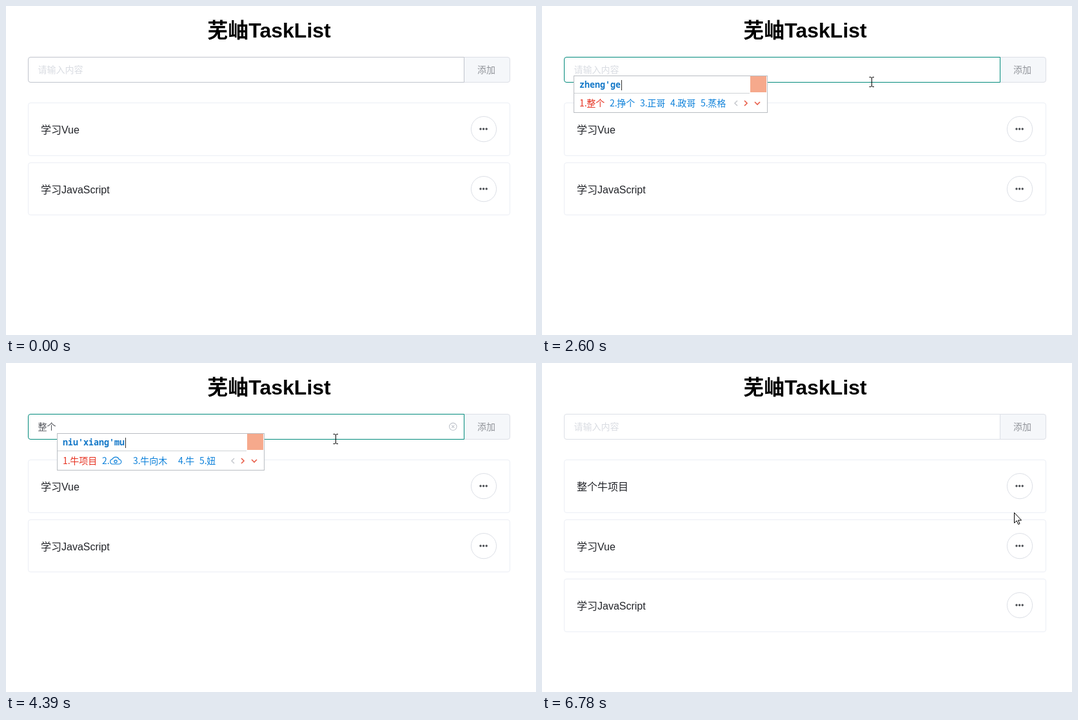
Recreate the animation shown at these times as an HTML page. Size 822 by 511 pixels, loop 6.86 s.

```html
<!DOCTYPE html>
<html lang="zh-CN">
<head>
<meta charset="utf-8">
<title>TaskList</title>
<style>
  html, body { margin: 0; width: 100%; height: 100%; overflow: hidden; background: #fff; }
  svg { display: block; }
  text { font: 14px "Liberation Sans", "Noto Sans CJK SC", "Noto Sans CJK", sans-serif; white-space: pre; }
  .title { font-size: 32px; font-weight: bold; text-anchor: middle; }
  .row text { font-size: 16px; fill: #212328; }
  .card { fill: none; stroke: #ebeef5; }
  .more { fill: #fff; stroke: #dcdfe6; }
  .dots { fill: #4b4e53; }
  .pinyin { font: bold 13.34px "Noto Sans Mono", "DejaVu Sans Mono", monospace; fill: #1478c8; }
  .cand text { font-family: "Noto Sans CJK SC", "Noto Sans CJK", sans-serif; }
  .line { fill: none; }
</style>
</head>
<body>
<svg width="822" height="511" viewBox="0 0 822 511">
  <text class="title" x="408" y="49">芜岫TaskList</text>

  <path d="M710.5 79.5H778a3.5 3.5 0 0 1 3.5 3.5V115a3.5 3.5 0 0 1-3.5 3.5H710.5z" fill="#f5f7fa" stroke="#dcdfe6"/>
  <text x="731" y="104" fill="#909399">添加</text>
  <path id="field" d="M710.5 79.5H38a3.5 3.5 0 0 0-3.5 3.5V115a3.5 3.5 0 0 0 3.5 3.5H710.5z" fill="#fff"/>
  <text id="value" x="49.5" y="104"></text>
  <path id="caret" d="M.5 91V107" stroke="#444"/>
  <g id="clear" class="line" stroke="#c0c4cc" stroke-width="1.1">
    <circle cx="693.3" cy="98.8" r="5.7"/>
    <path d="M691.2 96.7l4.2 4.2m0-4.2l-4.2 4.2"/>
  </g>

  <g id="rows"></g>
  <g id="popup"></g>

  <g id="arrow"><path d="M.5 .5V16.5L4.2 13L6.7 18.6L9 17.6L6.5 12.2H11.5z" fill="#fff" stroke="#000"/></g>
  <g id="beam"><path class="line" d="M-3.5 -7.5H-1L.5 -6.5L2 -7.5H4M.5 -6.5V6.5M-3.5 7.5H-1L.5 6.5L2 7.5H4" stroke="#000"/></g>
  <g id="hand"><path d="M-1.5 12V1.2a1.8 1.8 0 0 1 3.4 0V8a1.7 1.7 0 0 1 3.2 .4a1.7 1.7 0 0 1 3.2 .8a1.6 1.6 0 0 1 3 1V15c0 2-1.6 3-1.6 6H.2c0-3-3.4-5-5-8.4c-.8-2 1.6-3 3.3-.6z" fill="#fff" stroke="#000"/></g>
</svg>
<script>
const LOOP = 6860, ADDED = 6010;
const $ = id => document.getElementById(id);
const show = (el, on) => { el.style.display = on ? '' : 'none'; };

// Last entry of a step table whose time has come
const at = (table, t) => table.findLast(step => step[0] <= t);

const BORDER = [
  [0, '#c0c4cc'], [80, '#60a7a4'], [150, '#00897b'],
  [5930, '#37a295'], [6010, '#7ebdb8'], [6080, '#b5d2d3'], [6160, '#dcdfe6']
];
const VALUE = [[0, ''], [2680, '整个'], [4550, '整个牛项目'], [ADDED, '']];
const CARET = [
  [0, 0], [150, 1], [530, 0], [1060, 1], [1520, 0], [2060, 1], [2600, 0], [2680, 1], [3140, 0],
  [3690, 1], [4160, 0], [4550, 1], [4700, 0], [5250, 1], [5780, 0]
];

// time, typed letters, candidates, right edge of the popup
const IME = [
  [0],
  [1520, 'z', '在,这,再,中,最', 280],
  [1670, 'zh', '这,中,只,找,着', 280],
  [1830, 'zhe', '这,着,者,折,哲', 280],
  [2060, 'zhen', '真,真的,阵,珍,针', 301],
  [2220, "zheng'g", '整个,正规,正国,政工,蒸锅', 350],
  [2290, "zheng'ge", '整个,挣个,正哥,政哥,蒸格', 350],
  [2680],
  [2840, 'n', '你,那,哪,年,能', 311],
  [3140, 'ni', '你,呢,泥,尼,拟', 311],
  [3300, 'niu', '牛,妞,扭,钮,v', 315],
  [3540, "niu'x", '牛心,牛血,牛西,牛戏,牛下', 391],
  [3690, "niu'xi", '牛戏,牛西,牛喜,牛系,扭戏', 391],
  [3850, "niu'xia", '牛下,牛虾,扭下,钮下,牛夏', 391],
  [4010, "niu'xian", '牛腩,牛线,牛仙,扭线,牛县', 391],
  [4160, "niu'xiang", '牛像,牛向,牛象,牛香,扭向', 393],
  [4240, "niu'xiang'm", '牛项目,牛向,牛象,牛,妞', 393],
  [4390, "niu'xiang'mu", '牛项目,☁,牛向木 ,牛,妞', 401],
  [4470, "niu'xiang'mu", '牛项目,牛木,牛向木 ,牛,妞', 412],
  [4550]
];

const RED = '#e6301f', BLUE = '#0c80da';
const charWidth = c => ({ ' ': 9, '☁': 29 })[c] || 14;

function cloud(x, y) {
  return `<g class="line" stroke="${BLUE}" stroke-width="1.2" transform="translate(${x} ${y})">
    <path d="M4 0h10a3.6 3.6 0 0 0 .3-7.2A5.6 5.6 0 0 0 4-7.7A3.9 3.9 0 0 0 4 0z"/>
    <circle cx="9" cy="-4" r="2.2"/></g>`;
}

function popupMarkup(typed, list, right, left, top) {
  const end = left + 9.5 + typed.length * 8;
  let x = left + 9, cands = '';
  list.split(',').forEach((word, i) => {
    const y = top + 48;
    cands += `<g fill="${i ? BLUE : RED}"><text x="${x}" y="${y}">${i + 1}.</text>` +
      (word === '☁' ? cloud(x + 12, y) : `<text x="${x + 11.2}" y="${y}">${word}</text>`) + '</g>';
    x += 19 + [...word].reduce((sum, c) => sum + charWidth(c), 0);
  });
  const mid = top + 43;
  return `<rect x="${left + .5}" y="${top + .5}" width="${right - left - 1}" height="57" fill="#fff" stroke="#b9bdc2"/>
    <path d="M${left + 1} ${top + 27.5}H${right - 28}" stroke="#d0d3d6"/>
    <rect x="${right - 27}" y="${top + 1}" width="25" height="25" fill="#f6a98c"/>
    <text class="pinyin" x="${left + 9}" y="${top + 19}">${typed}</text>
    <path d="M${end + 1} ${top + 7}v16" stroke="#333"/>
    <g class="cand">${cands}</g>
    <g class="line" stroke-width="1.7" stroke="#e8604c">
      <path d="M${right - 47} ${mid - 4}l-4 4l4 4" stroke="#c9ccd1"/>
      <path d="M${right - 36} ${mid - 4}l4 4l-4 4"/>
      <path d="M${right - 20} ${mid - 2}l4 4l4-4"/>
    </g>`;
}

const rows = [0, 1, 2].map(i => {
  const g = document.createElementNS('http://www.w3.org/2000/svg', 'g');
  const top = Math.round(150 + i * 92.6);
  g.setAttribute('class', 'row');
  g.setAttribute('transform', `translate(0 ${top})`);
  g.innerHTML = `<rect class="card" x="34.5" y=".5" width="747" height="${i === 1 ? 81 : 82}" rx="3.5"/>
    <text x="54" y="48"></text><circle class="more" cx="741" cy="41.2" r="19.6"/>
    <g class="dots">${[736, 740.6, 745.2].map(x => `<circle cx="${x}" cy="41" r="1.7"/>`).join('')}</g>`;
  $('rows').append(g);
  return g;
});

const STEP = 76.25;
const mix = (a, b, p) => Math.round(a + (b - a) * p);
const easeOut = (p, power) => 1 - (1 - p) ** power;

// Pointer kind and hot spot; it moves in even ticks
function pointer(t) {
  if (t < 300) return null;
  if (t < 985) {
    const k = Math.min(8, Math.floor((t - 300) / STEP + .02));
    const p = easeOut(k / 8, 2);
    const y = mix(303, 119, p);
    return [y < 120 ? 'beam' : 'arrow', mix(745, 511, p), y];
  }
  if (t < 5250) return ['beam', 511, 118];
  if (t < 6710) {
    const k = Math.min(8, Math.floor((t - 5250) / STEP + .1) + 1);
    const p = easeOut(k / 8, 2.5);
    const x = mix(511, 729, p);
    return [x < 711 ? 'beam' : 'hand', x, mix(118, 101.6, p)];
  }
  return t < 6780 ? ['arrow', 734, 160] : ['arrow', 732, 232];
}

let shownIme;
function render(t) {
  $('field').setAttribute('stroke', at(BORDER, t)[1]);

  const value = at(VALUE, t)[1];
  $('value').textContent = value || '请输入内容';
  $('value').setAttribute('fill', value ? '#55585e' : '#d9dce2');
  show($('clear'), value && t >= 2840);
  show($('caret'), at(CARET, t)[1]);
  $('caret').setAttribute('transform', `translate(${50 + value.length * 14} 0)`);

  const ime = at(IME, t);
  if (ime !== shownIme) {
    shownIme = ime;
    const [, typed, list, right] = ime;
    const [left, top] = value ? [79, 109] : [49, 108];
    $('popup').innerHTML = typed ? popupMarkup(typed, list, right, left + 0.0 + (value ? 0 : 0), top) : '';
  }

  const items = ['学习Vue', '学习JavaScript'];
  if (t >= ADDED) items.unshift('整个牛项目');
  rows.forEach((row, i) => {
    show(row, i < items.length);
    row.querySelector('text').textContent = items[i] || '';
  });

  const spot = pointer(t);
  for (const kind of ['arrow', 'beam', 'hand']) {
    const on = spot && spot[0] === kind;
    show($(kind), on);
    if (on) $(kind).setAttribute('transform', `translate(${spot[1]} ${spot[2]})`);
  }
}

const start = performance.now();
function tick() {
  render((performance.now() - start) % LOOP);
  requestAnimationFrame(tick);
}
tick();
</script>
</body>
</html>
```
